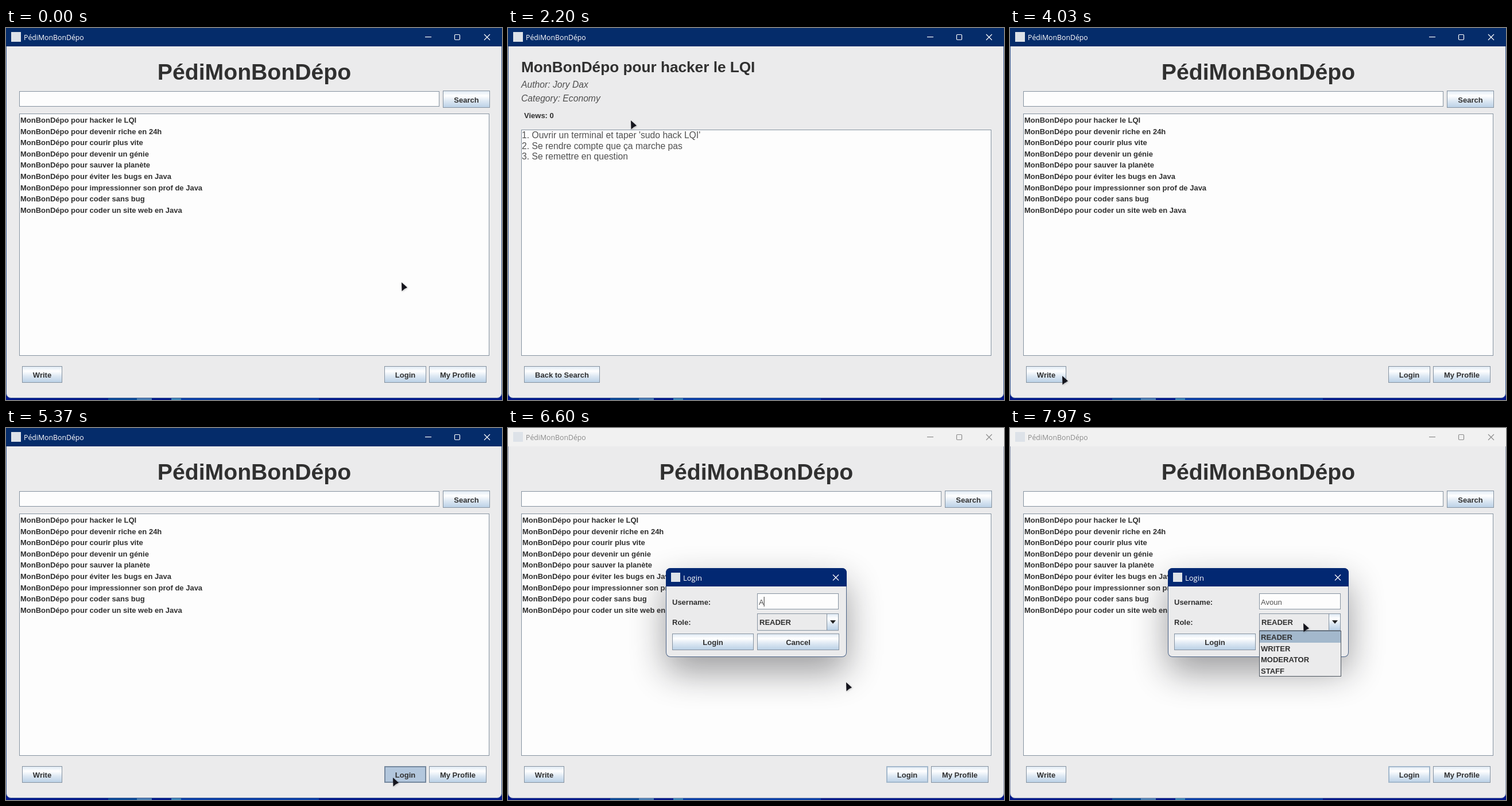
Recreate the animation shown at these times as an HTML page with a canvas. Size 864x648 px, loop 8 s.

```html
<!DOCTYPE html>
<html lang="fr">
<head>
<meta charset="utf-8">
<title>PédiMonBonDépo</title>
<style>
html, body { margin: 0; width: 100%; height: 100%; overflow: hidden; background: #03188a; }
canvas { display: block; }
</style>
</head>
<body>
<canvas id="stage" width="864" height="648"></canvas>
<script>
const ctx = document.getElementById('stage').getContext('2d');
const LOOP = 8000;
const SANS = '"Liberation Sans", Arial, sans-serif';
const UI = '"Open Sans", "Noto Sans", sans-serif';
const BOLD = `bold 13px ${SANS}`;
const APP = 'PédiMonBonDépo';
const PANEL = '#ebebec', EDGE = '#8592a0', INK = '#303030', GREY = '#505050';

const topics = ['hacker le LQI', 'devenir riche en 24h', 'courir plus vite',
  'devenir un génie', 'sauver la planète', 'éviter les bugs en Java',
  'impressionner son prof de Java', 'coder sans bug', 'coder un site web en Java'
].map(s => 'MonBonDépo pour ' + s);
const steps = ["1. Ouvrir un terminal et taper 'sudo hack LQI'",
  '2. Se rendre compte que ça marche pas', '3. Se remettre en question'];
const roles = ['READER', 'WRITER', 'MODERATOR', 'STAFF'];
const user = 'Avoun';

// Moments when the interface changes, in ms
const at = { article: 1500, back: 3880, press: 5270, dialog: 5450, typing: 6550, menu: 7720 };
const KEY_GAP = 130;

// Pointer stops: time, x, y
const path = [[0, 689, 443], [870, 229, 198], [1150, 214, 161], [2200, 214, 161],
  [3050, 157, 591], [3880, 157, 591], [4030, 91, 606], [4130, 91, 606],
  [5150, 674, 609], [5530, 674, 609], [6350, 589, 443], [7150, 589, 443],
  [7600, 511, 340], [LOOP, 511, 340]];

function pointerAt(t) {
  let i = 1;
  while (i < path.length - 1 && t > path[i][0]) i++;
  const [t0, x0, y0] = path[i - 1], [t1, x1, y1] = path[i];
  const p = (t - t0) / (t1 - t0), e = p * p * (3 - 2 * p);
  return [x0 + (x1 - x0) * e, y0 + (y1 - y0) * e];
}

function text(s, x, y, font = BOLD, color = INK, align = 'left') {
  ctx.font = font;
  ctx.fillStyle = color;
  ctx.textAlign = align;
  ctx.fillText(s, x, y);
}

function fill(x, y, w, h, color) {
  ctx.fillStyle = color;
  ctx.fillRect(x, y, w, h);
}

function frame(x, y, w, h, color = EDGE, width = 1) {
  ctx.strokeStyle = color;
  ctx.lineWidth = width;
  ctx.strokeRect(x + width / 2, y + width / 2, w - width, h - width);
}

function box(x, y, w, h, color = '#fdfdfd', edge = EDGE) {
  fill(x, y, w, h, color);
  frame(x, y, w, h, edge);
}

function poly(points, color) {
  ctx.beginPath();
  points.forEach(([x, y]) => ctx.lineTo(x, y));
  ctx.closePath();
  ctx.fillStyle = color;
  ctx.fill();
}

function shine(y, h) {
  const g = ctx.createLinearGradient(0, y, 0, y + h);
  g.addColorStop(0, '#dde8f3');
  g.addColorStop(0.3, '#ffffff');
  g.addColorStop(0.6, '#dde8f3');
  g.addColorStop(1, '#b8cfe5');
  return g;
}

function button(label, x, y, w, h, state) {
  box(x, y, w, h, state === 'pressed' ? '#b3c7dd' : shine(y, h));
  if (state === 'pressed') frame(x, y, w, h, '#75889e', 2);
  if (state === 'focus') frame(x, y, w, h, '#a3b8cc', 2);
  text(label, x + w / 2, Math.round(y + h / 2 + 5.5), BOLD, INK, 'center');
}

function cross(x, y, color) {
  ctx.strokeStyle = color;
  ctx.lineWidth = 1.2;
  ctx.beginPath();
  ctx.moveTo(x, y); ctx.lineTo(x + 10, y + 10);
  ctx.moveTo(x + 10, y); ctx.lineTo(x, y + 10);
  ctx.stroke();
}

function drawWindow(active) {
  fill(0, 0, 864, 648, '#03188a');
  fill(178, 644, 50, 4, '#0b4a96');
  fill(228, 644, 26, 4, '#4d7fb4');
  fill(288, 644, 17, 4, '#3f86b8');
  fill(305, 644, 240, 4, '#0a3fa8');
  ctx.beginPath();
  ctx.roundRect(0.5, -10, 863, 654.5, 8);
  ctx.fillStyle = PANEL;
  ctx.fill();
  ctx.strokeStyle = active ? '#3b5b94' : '#8f9bb4';
  ctx.lineWidth = 1;
  ctx.stroke();

  const ink = active ? '#ffffff' : '#8c8c8c';
  fill(0, 0, 864, 32, active ? '#052c6a' : '#f1f1f1');
  fill(9, 7, 17, 17, '#dde2e8');
  text(APP, 31, 20.5, `12.3px ${UI}`, ink);
  fill(730, 15, 11, 1.2, ink);
  ctx.beginPath();
  ctx.roundRect(781.5, 11.5, 9, 9, 1.5);
  ctx.strokeStyle = ink;
  ctx.lineWidth = 1.2;
  ctx.stroke();
  cross(833, 11, ink);
}

function drawHome(t) {
  text(APP, 432.5, 90, `bold 39.2px ${SANS}`, INK, 'center');
  box(23, 110, 732, 27);
  if (t >= 500 && t < 1000) fill(25, 115, 1, 18, '#222');
  button('Search', 761, 109, 82, 30);
  box(23, 149, 819, 422);
  topics.forEach((s, i) => text(s, 25, 165 + i * 19.6));
  button('Write', 28, 589, 70, 29);
  const state = t >= at.dialog ? 'focus' : t >= at.press ? 'pressed' : '';
  button('Login', 659, 589, 73, 29, state);
  button('My Profile', 737, 589, 100, 29);
}

function drawArticle() {
  text(topics[0], 23, 77, `bold 26.2px ${SANS}`);
  const italic = `italic 15.7px ${SANS}`;
  text('Author: Jory Dax', 23, 104, italic, GREY);
  text('Category: Economy', 23, 128, italic, GREY);
  text('Views: 0', 28, 157);
  box(23, 177, 819, 394);
  steps.forEach((s, i) => text(s, 24, 192 + i * 18.7, `15.7px ${SANS}`, GREY));
  button('Back to Search', 28, 589, 132, 29);
}

function drawDialog(t) {
  ctx.save();
  ctx.beginPath();
  ctx.roundRect(275, 244, 315, 155, 8);
  ctx.save();
  ctx.shadowColor = 'rgba(20, 20, 25, 0.42)';
  ctx.shadowBlur = 62;
  ctx.shadowOffsetY = 26;
  ctx.fillStyle = PANEL;
  ctx.fill();
  ctx.restore();
  ctx.clip();
  ctx.strokeStyle = '#4a6286';
  ctx.lineWidth = 2;
  ctx.stroke();
  fill(275, 244, 315, 32, '#022872');
  ctx.restore();

  fill(284, 252, 16, 16, '#dde2e8');
  text('Login', 305, 266, `13px ${UI}`, '#ffffff');
  cross(566, 255.5, '#ffffff');

  text('Username:', 286, 308);
  box(434, 288, 142, 28);
  const typed = t < at.typing ? 0 : Math.floor((t - at.typing) / KEY_GAP) + 1;
  const name = user.slice(0, typed);
  text(name, 437, 308, `13px ${SANS}`, GREY);
  const blink = typed > 0 || (t - at.dialog) % 1000 < 500;
  if (blink && t < 7400) fill(437 + ctx.measureText(name).width, 294, 1, 17, '#333');

  text('Role:', 286, 343);
  box(434, 323, 142, 30, PANEL);
  box(555, 323, 21, 30, shine(323, 30));
  poly([[561, 335], [571, 335], [566, 341]], '#222');
  text('READER', 438, 343);
  button('Login', 286, 358, 142, 29);
  button('Cancel', 434, 358, 143, 29);

  if (t >= at.menu) {
    box(434, 353, 143, 80, PANEL, '#4d5660');
    fill(435, 354, 141, 20, '#a3b8cc');
    roles.forEach((s, i) => text(s, 437, 369 + i * 19.6));
  }
}

function drawPointer(t) {
  const [x, y] = pointerAt(t);
  ctx.save();
  ctx.translate(x, y);
  ctx.shadowColor = 'rgba(0, 0, 0, 0.25)';
  ctx.shadowBlur = 3;
  ctx.shadowOffsetX = 1;
  ctx.shadowOffsetY = 1;
  poly([[0, 0], [10, 9], [5, 11.5], [0.5, 15.5]], '#14141c');
  ctx.restore();
}

function render(t) {
  const open = t >= at.dialog;
  drawWindow(!open);
  if (t >= at.article && t < at.back) drawArticle();
  else drawHome(t);
  if (open) drawDialog(t);
  drawPointer(t);
}

const start = performance.now();
function tick() {
  render((performance.now() - start) % LOOP);
  requestAnimationFrame(tick);
}
tick();
</script>
</body>
</html>
```
